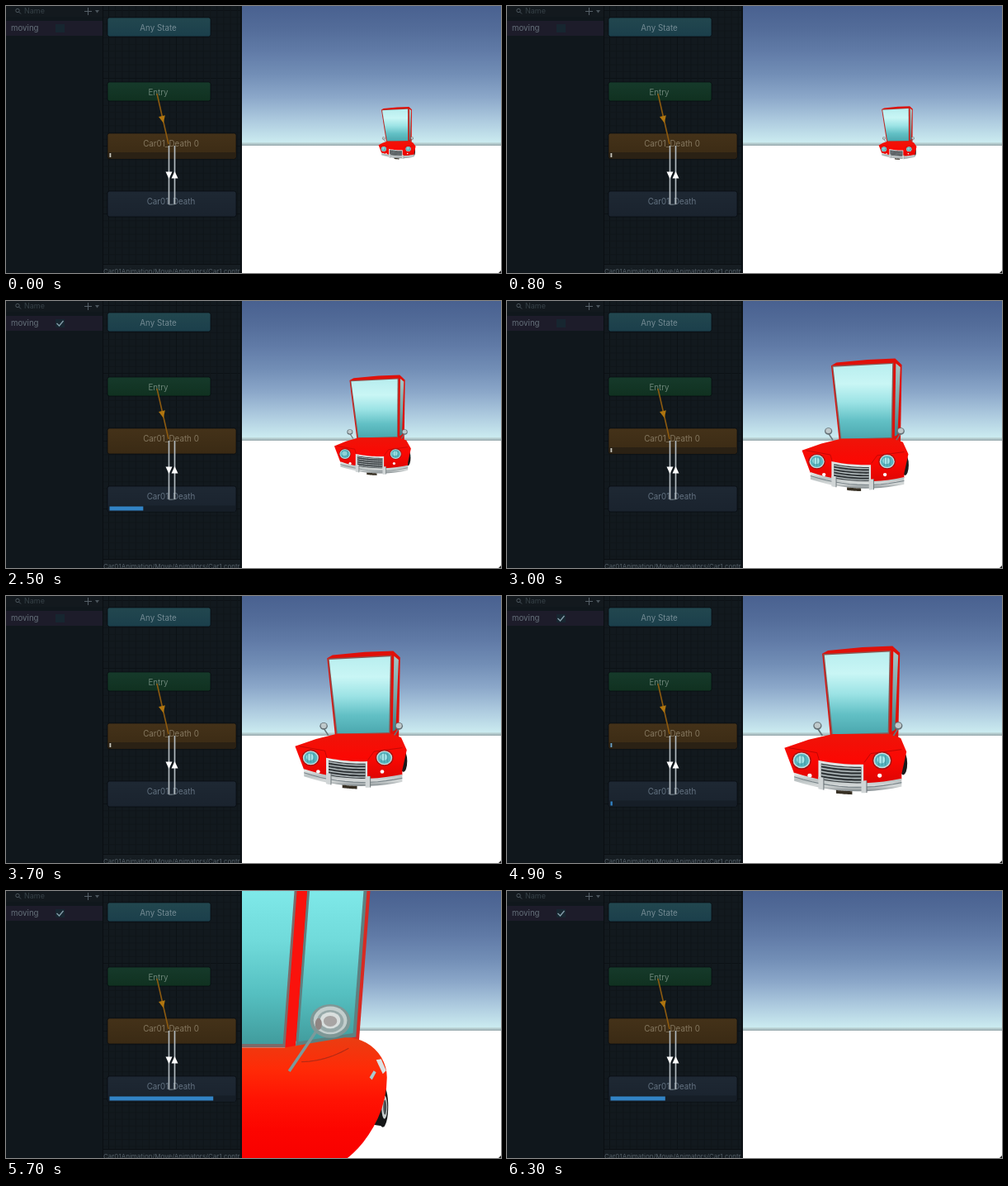
An HTML page with a canvas that plays this animation: 600 px wide and 323 px high, repeating every 6400 ms.

```html
<!DOCTYPE html>
<html lang="en">
<head>
<meta charset="utf-8">
<title>Animator and car</title>
<style>
html, body { margin: 0; width: 100%; height: 100%; overflow: hidden; background: #10161b; }
canvas { display: block; width: 600px; height: 323px; }
</style>
</head>
<body>
<canvas id="stage" width="600" height="323"></canvas>
<script>
const ctx = document.getElementById('stage').getContext('2d');
const LOOP = 6400, STEP = 100, BLEND = 0.25;
const STARTS = [1.25, 4.885], STOP = 2.68;
const IDLE_SPEED = 0.078, DRIVE_SPEED = 1.43;
const VANISH = { x: 502, y: 161.5 };
const VIEW_X = 286;
const SIDES = [-1, 1];
let distance = 1;

const clamp = v => Math.max(0, Math.min(1, v));
const range = (n, f) => Array.from({ length: n + 1 }, (_, i) => f(i / n));

// Integral of a 0..1 ramp beginning at time zero.
function rampArea(t) {
  if (t <= 0) return 0;
  return t < BLEND ? t * t / (2 * BLEND) : t - BLEND / 2;
}

function carDistance(t) {
  const driven = rampArea(t - STARTS[0]) - rampArea(t - STOP) + rampArea(t - STARTS[1]);
  return 3.33 - IDLE_SPEED * t - (DRIVE_SPEED - IDLE_SPEED) * driven;
}

function fade(y0, y1, colors) {
  const g = ctx.createLinearGradient(0, y0, 0, y1);
  colors.forEach((c, i) => g.addColorStop(i / (colors.length - 1), c));
  return g;
}

function rect(x, y, w, h, fill) {
  ctx.fillStyle = fill;
  ctx.fillRect(x, y, w, h);
}

function trace(points) {
  ctx.beginPath();
  points.forEach(([x, y]) => ctx.lineTo(x, y));
}

function line(points, color, width = 1) {
  trace(points);
  ctx.strokeStyle = color;
  ctx.lineWidth = width;
  ctx.stroke();
}

function shape(points, fill) {
  trace(points);
  ctx.fillStyle = fill;
  ctx.fill();
}

function text(str, x, y, color, size = 9.8, align = 'center') {
  ctx.font = `${size}px Inter, "Open Sans", sans-serif`;
  ctx.textAlign = align;
  ctx.textBaseline = 'middle';
  ctx.fillStyle = color;
  ctx.fillText(str, x, y);
}

function node(label, y, w, h, colors, ink) {
  ctx.beginPath();
  ctx.roundRect(123, y, w, h, 2.5);
  ctx.fillStyle = fade(y, y + h, colors);
  ctx.fill();
  ctx.strokeStyle = 'rgba(5,9,13,.65)';
  ctx.lineWidth = 1;
  ctx.stroke();
  return () => text(label, 123 + w / 2 - 1, y + 12.7, ink);
}

function progressBar(y, value, track, color) {
  rect(124, y, 154, 7, track);
  rect(125.5, y + 1, Math.max(1.8, 152 * value), 5, color);
}

function arrow(x, y, angle, color) {
  ctx.save();
  ctx.translate(x, y);
  ctx.rotate(angle);
  shape([[-4, -4], [4, -4], [0, 4.5]], color);
  ctx.restore();
}

function glow(x, from, to) {
  ctx.save();
  ctx.shadowColor = '#2388ff';
  ctx.shadowBlur = 6;
  line([[x, from], [x, to]], '#3c8de0', 4);
  ctx.restore();
}

function drawSidebar(checked) {
  rect(0, 0, 118, 323, '#10171c');
  rect(0, 0, 118, 13, '#13191e');
  rect(0, 18, 117, 18, '#1d1c2a');
  ctx.beginPath();
  ctx.arc(14, 5.5, 2.2, 0, 7);
  ctx.strokeStyle = '#4b555c';
  ctx.lineWidth = 1;
  ctx.stroke();
  line([[15.5, 7], [18, 9.5]], '#4b555c');
  text('Name', 22, 6.5, '#364047', 9, 'left');
  line([[95, 6.5], [104, 6.5]], '#566068');
  line([[99.5, 2], [99.5, 11]], '#566068');
  shape([[108, 5], [113, 5], [110.5, 8.5]], '#4b555c');
  text('moving', 6, 27.5, '#65707a', 9.7, 'left');
  rect(60, 22, 11, 10, '#172630');
  if (checked) line([[61.5, 27], [64.5, 30], [69.5, 24]], '#86a0ac', 1.3);
  rect(117, 0, 1, 323, '#0a0e12');
}

function drawGraph(t) {
  rect(118, 0, 168, 323, '#12191e');
  for (let i = 0; i < 38; i++) {
    const color = i % 10 ? '#10161a' : '#0c1115';
    if (i < 20) rect(124 + i * 8.2, 0, 1, 313, color);
    rect(118, 5 + i * 8.2, 168, 1, color);
  }

  const start = STARTS.findLast(s => t >= s);
  const driving = start === STARTS[1] || start === STARTS[0] && t < STOP + BLEND;
  const blending = driving && t < start + BLEND + 0.05;

  const labels = [
    node('Any State', 14, 125, 23, ['#22474f', '#1b3f4b'], '#738a93'),
    node('Entry', 92, 125, 23, ['#163a2b', '#103120'], '#6c8578'),
    node('Car01_Death 0', 154, 156, 31, ['#443219', '#3a2a14'], '#84775f'),
    node('Car01_Death', 224, 156, 31, ['#1e2833', '#1a232e'], '#637281')
  ];
  if (!driving || blending) progressBar(177, 0.01, '#2a2114', driving ? '#6ca4c9' : '#c7c5bb');
  if (driving) progressBar(247.5, (t - start) * 1.015 % 1, '#161e27', '#3283c5');
  labels.forEach(draw => draw());

  line([[183, 106], [197, 167]], '#8c5a10', 1.6);
  arrow(189.8, 137, -0.23, '#b0750f');
  if (blending && t > start + 0.03) glow(196.5, 170, 170 + 70 * clamp((t - start) / BLEND));
  if (t > STOP && t < STOP + BLEND) glow(205.5, 240, 240 - 70 * (t - STOP) / BLEND);
  for (const side of SIDES) {
    const x = 201 + 3.5 * side;
    line([[x, 169], [x, 240]], '#b0b8bd', 1.7);
    arrow(x, 204.5, side > 0 ? Math.PI : 0, '#fff');
  }
  line([[197.5, 240], [204.5, 240]], '#647079');

  rect(118, 313, 168, 10, '#161d22');
  rect(118, 312, 168, 1, '#0a0f12');
  text('Car01Animation/Move/Animators/Car1.contr', 118, 322, '#525d65', 8, 'left');
  rect(284, 0, 2, 323, '#0b1014');
}

function drawSky() {
  rect(VIEW_X, 0, 314, 323, '#fff');
  rect(VIEW_X, 0, 314, 165, fade(0, 165,
    ['#496190', '#536c99', '#617ba7', '#728eb6', '#8ba7c9', '#acc9de', '#cbebf0']));
  rect(VIEW_X, 165, 314, 4, fade(165, 169, ['#c3dfe1', '#98a8ac']));
}

// Points are given as seen from a reference distance, with an optional depth.
function lens(reference) {
  const scale = z => (reference + z) / Math.max(0.03, distance + z);
  const project = depth => ([x, y, z = depth]) => [
    VANISH.x + (x - VANISH.x) * scale(z),
    VANISH.y + (y - VANISH.y) * scale(z)
  ];
  return {
    poly: (points, fill, z = 0) => shape(points.map(project(z)), fill),
    stroke: (points, color, width, z = 0) => line(points.map(project(z)), color, width * scale(z)),
    oval(x, y, rx, ry, fill, z = 0) {
      if (distance + z < 0.03) return;
      ctx.beginPath();
      ctx.ellipse(...project(z)([x, y]), rx * scale(z), ry * scale(z), 0, 0, Math.PI * 2);
      ctx.fillStyle = fill;
      ctx.fill();
    },
    fade: (y0, y1, z, colors) => fade(project(z)([0, y0])[1], project(z)([0, y1])[1], colors)
  };
}

// Shrinks a panel towards its middle by a number of pixels.
function inset(points, px) {
  const mid = i => points.reduce((sum, p) => sum + p[i], 0) / points.length;
  const cx = mid(0), cy = mid(1);
  return points.map(([x, y, z]) => [x - px * Math.sign(x - cx), y - px * Math.sign(y - cy), z]);
}

// Bowed nose of the car: u runs across it, h is the height over the bumper.
const nose = (u, h) => [412 + 66 * u, 229 + 3.5 * u - 9 * u * u - h];
const noseLine = (u0, u1, h) => range(12, k => nose(u0 + (u1 - u0) * k, h));
const noseBand = (u0, u1, h0, h1) => [...noseLine(u0, u1, h1), ...noseLine(u1, u0, h0)];

function drawFront() {
  const v = lens(1);
  v.oval(480, 203, 5, 14, '#1a1a1b', 0.3);

  const roof = 0.48, sill = 0.36;
  const glass = [[383, 70, roof], [464, 66, roof], [462, 166, sill], [393, 168, sill]];
  const sideGlass = [[468, 66, roof], [474, 71, roof], [470, 162, sill], [466, 164, sill]];
  v.poly([[381, 69, roof], [388, 65, roof], [430, 61, roof], [467, 59.5, roof],
    [476, 68, roof], [474, 172, sill], [391, 172, sill]], '#df1009');
  v.poly(inset(glass, -0.8), '#8b5854');
  v.poly(inset(glass, 0.7), v.fade(68, 168, 0.42, ['#b9eeef', '#c9f6f5', '#9ce3e5', '#62c0c5', '#4aa6ad']));
  v.poly(sideGlass, v.fade(66, 164, 0.42, ['#a5c5c5', '#78aaac', '#3f7f85']));

  v.poly([[334, 184], [364, 174, 0.15], [394, 167, sill], [465, 167, sill], [477, 172, 0.25],
    [484, 189], [478, 216], ...noseLine(1, -1, 1)], v.fade(167, 229, 0.1, ['#ee1409', '#fb0803', '#dc0502']));
  v.stroke([[340, 184], [374, 190], [377, 200]], '#bd0805', 1);
  v.stroke([[432, 202], [440, 191], [478, 186]], '#bd0805', 1);

  v.poly(noseBand(-0.55, 0.29, 0, 25), '#dfe4e4');
  v.poly(noseBand(-0.5, 0.25, 1, 22), '#34393c');
  for (let h = 4; h < 22; h += 4) v.stroke(noseLine(-0.5, 0.25, h), '#b9c2c4', 1.5);

  for (const side of SIDES) {
    const x = 404.5 + 49.5 * side, y = 199.5;
    v.oval(x, y, 12, 11, '#a51210');
    v.oval(x, y, 10.5, 9.5, '#c5dfe0');
    v.oval(x, y, 9, 8, '#58b4be');
    v.oval(x - 1, y - 1, 5, 4.5, '#a5e5e8');
    for (const i of [-1, 0, 1]) v.stroke([[x + i * 4, y - 6], [x + i * 4, y + 6]], '#3c8c98', 0.8);
    v.oval(408 + 43 * side, 218, 2.6, 2.5, '#fff');
  }

  v.poly(noseBand(-1, 1, -8, 2), v.fade(216, 238, 0, ['#e5e8e7', '#b9c1c2', '#d5d9d9', '#778084']));
  v.stroke(noseLine(-1, 1, -3), '#788388', 1.2);
  for (const side of SIDES) {
    const u = -0.1 + 0.4 * side;
    v.poly(noseBand(u - 0.05, u + 0.05, -10, 5), '#d0d5d6');
    v.stroke([nose(u + 0.05, 5), nose(u + 0.05, -10)], '#646d71', 1);
  }
  v.poly(noseBand(-0.22, 0.08, -12, -8), '#373024');

  for (const side of SIDES) {
    const x = 424.5 + 49.5 * side;
    v.stroke([[x, 160], [x - 6 * side, 169]], '#657579', 1.8, 0.25);
    v.oval(x, 157, 5.2, 4.8, '#667176', 0.25);
    v.oval(x, 156.5, 3.8, 3.4, '#bfc9cb', 0.25);
  }
}

// Flank of the car: panels lean forward and recede towards the tail.
const flank = (x, y) => [x - 0.075 * y, y, 0.3 + 0.4 * clamp((x - 360) / 80)];
const belt = x => 190 - 14 * clamp((x - 350) / 90);
const panel = (x0, x1, lift = 0) => [
  flank(x0, -200), flank(x1, -200), flank(x1, belt(x1) - lift), flank(x0, belt(x0) - lift)
];

function tailPoint(k) {
  const a = (k - 0.5) * Math.PI, lower = a > 0;
  const reach = Math.cos(a) ** (lower ? 1.7 : 1);
  return [412 + 50 * reach, 225 + (lower ? 98 : 48) * Math.sin(a), 0.4 + 0.4 * reach];
}

function drawSide() {
  const v = lens(0.024);
  const tail = 0.8;
  v.poly([[440, 235], [459, 235], [459, 284], [439, 281]], '#151617', tail);
  v.oval(457, 260, 6.5, 25, '#151617', tail);
  v.oval(459, 261, 3.5, 14, '#c9cfcf', tail);
  v.oval(459.5, 261, 2, 9, '#4b5052', tail);

  const tint = v.fade(0, 188, 0.35, ['#7fe9e9', '#70dada', '#55bfc0', '#409a9b']);
  v.poly(panel(-200, 442, -4), '#d82a22');
  v.poly(panel(367, 438), '#5d8080');
  v.poly(panel(370, 434, 5), tint);
  v.poly(panel(-200, 356), '#7d6a69');
  v.poly(panel(-200, 352, 5), tint);
  v.poly(panel(355, 367, -2), '#fa120c');

  v.poly([[-200, 191, 0.25], [340, 189, 0.3], ...range(24, tailPoint), [390, 500, 0.3], [-200, 600, 0.2]],
    v.fade(178, 323, 0.4, ['#ea3d12', '#ff2b07', '#ff1303', '#fc0500', '#f80000']));
  v.stroke(range(12, k => [360 + 56 * k, 206 - 16 * k * k, 0.35 + 0.3 * k]), '#b52a15', 1.2, 0.4);
  v.poly([[449, 204], [455, 203], [461, 217], [457, 221]], '#dbe2e3', tail);
  v.poly([[441, 225], [446, 217], [449, 219], [444, 228]], '#a9c9cf', tail);

  v.stroke([[380, 167], [346, 217]], '#7b9a9b', 3.5, 0.25);
  ['#7f9796', '#c2cecd', '#97a9a9', '#d9dfde', '#a8a5a4'].forEach((color, i) =>
    v.oval(395, 157.5 - (i % 2), 24 - 4 * i, 20 - 3.4 * i, color, 0.25));
  v.oval(381, 161, 4, 7, '#8f8583', 0.25);
}

function drawScene(t) {
  distance = carDistance(t);
  drawSidebar(t >= 1.2 && t < 2.65 || t >= 4.85);
  drawGraph(t);
  ctx.save();
  ctx.beginPath();
  ctx.rect(VIEW_X, 0, 314, 323);
  ctx.clip();
  drawSky();
  if (distance > 0.25) drawFront();
  else if (distance > -0.78) drawSide();
  shape([[600, 320], [600, 323], [597, 323]], '#222');
  ctx.restore();
}

const begin = performance.now();
function tick() {
  const elapsed = (performance.now() - begin) % LOOP;
  drawScene(Math.floor(elapsed / STEP) * STEP / 1000);
  requestAnimationFrame(tick);
}
tick();
</script>
</body>
</html>
```
